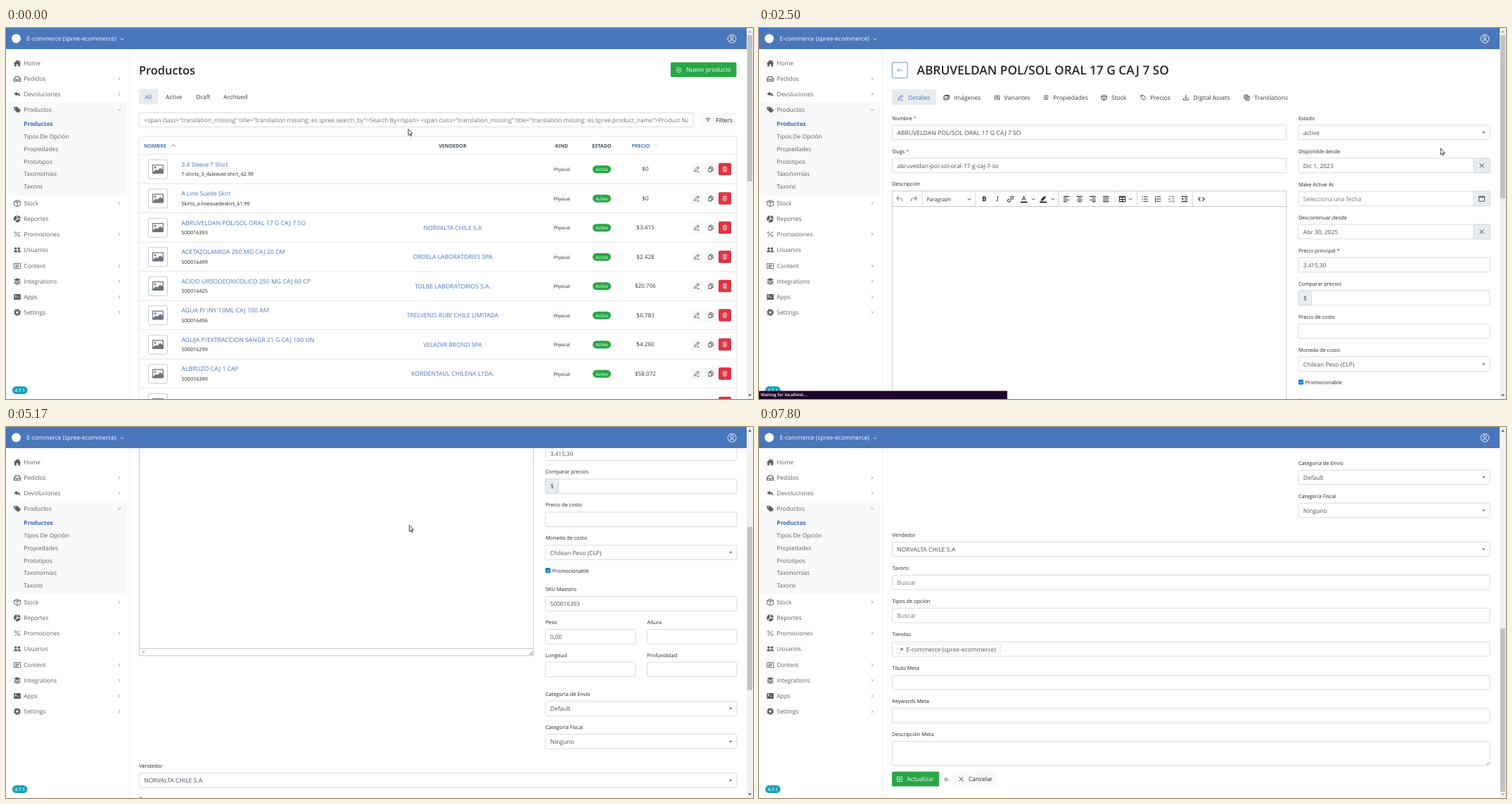
Write an HTML page that moves like this. It is 1062 px wide and 527 px high and loops after 8.13 s.

```html
<!DOCTYPE html>
<html lang="es">
<head>
<meta charset="utf-8">
<title>Productos</title>
<style>
html, body { margin: 0; width: 100%; height: 100%; overflow: hidden; background: #fff; }
svg { display: block; font-family: "Open Sans", "Noto Sans", sans-serif; text-rendering: geometricPrecision; }
</style>
</head>
<body>
<svg id="stage" width="1062" height="527" viewBox="0 0 1062 527"></svg>
<script>
const BLUE = '#4a76bb', GREEN = '#28a745', RED = '#dc3545', INK = '#495057', DARK = '#212529';
const SIDE = '#5f5f5f', LINE = '#ced4da', RULE = '#dee2e6', PALE = '#f8f9fa', SOFT = '#e9ecef';
const BASE = 8.46, CAPS = 8.7, SMALL = 7.35, HEAD = 16.4;
const LOOP = 8130;

const esc = s => s.replace(/&/g, '&amp;').replace(/</g, '&lt;').replace(/>/g, '&gt;');

// y is the middle of the capitals
function text(x, y, s, { z = BASE, c = INK, a = 'start', w = 400, more = '', tail = '' } = {}) {
  return `<text x="${x}" y="${(y + z * .355).toFixed(2)}" font-size="${z}" fill="${c}" text-anchor="${a}" font-weight="${w}" ${more}>${esc(s)}${tail}</text>`;
}
function rect(x, y, w, h, { f = 'none', s = 'none', r = 0 } = {}) {
  return `<rect x="${x}" y="${y}" width="${w}" height="${h}" rx="${r}" fill="${f}" stroke="${s}" stroke-width=".8"/>`;
}
function fill(x, y, d, c = SIDE) {
  return `<path transform="translate(${x} ${y})" d="${d}" fill="${c}" fill-rule="evenodd"/>`;
}
function line(x, y, d, c = SIDE, w = .8) {
  return `<path transform="translate(${x} ${y})" d="${d}" fill="none" stroke="${c}" stroke-width="${w}" stroke-linejoin="round"/>`;
}

const P = {
  right: 'M-1.2 -2.2L1.2 0L-1.2 2.2',
  down: 'M-2.5 -1.2L0 1.2L2.5 -1.2',
  up: 'M-3 1.6L0 -1.6L3 1.6',
  wide: 'M-3 -1.6L0 1.6L3 -1.6',
  cross: 'M-3 -3L3 3M3 -3L-3 3',
  pencil: 'M-3.5 3.5L-2.7 .8L1.8 -3.7L3.5 -2L-1 2.5ZM.6 -2.5L2.3 -.8M0 3.8H4',
  copy: 'M-3 -1.5H1V3.7H-3ZM-1.3 -1.5V-3.5H1.5L3.2 -1.8V2H1',
  trash: 'M-3 -2.4H3M-1 -2.6V-3.4H1V-2.6M-2.4 -2.2L-2 3.4H2L2.4 -2.2M-.7 -1V2.3M.7 -1V2.3',
  picture: 'M-7 -6.5H7Q8 -6.5 8 -5.5V5.5Q8 6.5 7 6.5H-7Q-8 6.5 -8 5.5V-5.5Q-8 -6.5 -7 -6.5ZM-6.8 -5.3V4L-3 .6L-.6 2L3 -1.8L6.8 .6V-5.3ZM-4 -4A1.5 1.5 0 1 1 -4 -1A1.5 1.5 0 1 1 -4 -4Z',
  caret: 'M-2.2 -1H2.2L0 1.3Z'
};

/* ---------- frame around the page ---------- */
const menuIcons = [
  fill(16, 50, 'M-5 .2L0 -4.7L2.4 -2.4V-4H3.6V-1.2L5 .2L4 .9V4.5H1.2V1.5H-1.2V4.5H-4V.9Z'),
  line(16, 72, 'M-4.5 .5L-2.6 -2.8H2.6L4.5 .5V3.3H-4.5ZM-4.5 .5H-1.6Q0 2.6 1.6 .5H4.5', SIDE, 1.2),
  fill(16, 94, 'M-4.7 -.4L-.5 -3.6V-1.7Q4.2 -1.6 4.5 3.6Q2.8 1 -.5 1V2.8Z'),
  fill(16, 116, 'M-4.7 -4H-1L4 1L.4 4.6L-4.7 -.5ZM-3.3 -2.7V-1.4H-2V-2.7ZM.3 -4L5.3 1L2.4 4.2L1.6 3.7L4.2 1L-.8 -4Z'),
  line(16, 249, 'M-4.5 -2.6L0 -4.4L4.5 -2.6V2.6L0 4.5L-4.5 2.6ZM-4.5 -2.6L0 -.8L4.5 -2.6M0 -.8V4.5M-2.3 -3.5L2.2 -1.7', SIDE, .9),
  fill(16, 271, 'M-.5 -4.7V0L-3.8 3.2A4.7 4.7 0 0 1 -.5 -4.7ZM.6 -4.7A4.7 4.7 0 0 1 4.7 -.6L.6 -.4ZM4.7 .5A4.7 4.7 0 0 1 -3 4L.4 .7Z'),
  line(16, 293, 'M-3.5 3.5L3.5 -3.5M-2.5 -3.4A1.3 1.3 0 1 1 -2.6 -3.4M2.5 .9A1.3 1.3 0 1 1 2.4 .9', SIDE, 1),
  fill(16, 315, 'M-2.2 -3.6A1.8 1.8 0 1 1 -2.3 -3.6ZM2.4 -3.6A1.8 1.8 0 1 1 2.3 -3.6ZM-5 3.6Q-4.8 .6 -2.2 .6Q0 .6 .1 3.6ZM.9 3.6Q1 1.6 .2 1Q1 .6 2.4 .6Q5 .6 5 3.6Z'),
  line(16, 338, 'M-4.6 -3.5H4.6V3.5H-4.6ZM-2.8 -1.3H2.8M-2.8 .2H2.8M-2.8 1.7H1', SIDE, .9),
  fill(16, 360, 'M0 -4.8L5 -2.5L0 -.2L-5 -2.5ZM-3.6 -.8L0 .9L3.6 -.8L5 0L0 2.3L-5 0ZM-3.6 1.6L0 3.3L3.6 1.6L5 2.4L0 4.7L-5 2.4Z'),
  fill(16, 382, 'M-4.8 -4H4.8V4H-4.8ZM-3.6 -2.5L-2 -1.2L-3.6 .1L-3 .7L-.8 -1.2L-3 -3.1ZM-.6 .3V1.1H2V.3Z'),
  `<circle cx="16" cy="404" r="2.9" fill="none" stroke="${SIDE}" stroke-width="2.3"/><circle cx="16" cy="404" r="4.4" fill="none" stroke="${SIDE}" stroke-width="1.3" stroke-dasharray="1.73"/>`
].join('');

// label, y, arrow (0 none, 1 right, 2 down)
const menu = [['Home', 50, 0], ['Pedidos', 72, 1], ['Devoluciones', 94, 1], ['Productos', 116, 2],
  ['Stock', 249, 1], ['Reportes', 271, 0], ['Promociones', 293, 1], ['Usuarios', 315, 0],
  ['Content', 338, 1], ['Integrations', 360, 1], ['Apps', 382, 1], ['Settings', 404, 1]];
const submenu = ['Tipos De Opción', 'Propiedades', 'Prototipos', 'Taxonomías', 'Taxons'];

const sidebar = rect(0, 30, 175, 497, { f: '#fff' }) + rect(175, 30, .8, 497, { f: SOFT }) +
  rect(2, 105, 170, 133, { f: PALE, r: 2 }) + menuIcons +
  menu.map(([s, y, k]) => text(25.3, y, s, { z: 8.4, c: SIDE }) +
    (k ? line(161, y, k > 1 ? P.down : P.right, '#888', .7) : '')).join('') +
  text(25.3, 136.3, 'Productos', { z: 8.2, c: '#3563b5', w: 700 }) +
  submenu.map((s, i) => text(25.3, 154.2 + i * 17.7, s, { z: 8.4, c: SIDE })).join('') +
  rect(9, 509, 21.5, 11, { f: '#17a2b8', r: 5.5 }) +
  text(19.7, 514.5, '4.7.1', { z: 6.3, c: '#fff', a: 'middle', w: 600 });

const header = rect(0, 0, 1053, 30, { f: BLUE }) +
  '<circle cx="14.5" cy="15" r="6.5" fill="#fff"/>' +
  text(29.5, 15.4, 'E-commerce (spree-ecommerce)', { c: '#fff' }) + line(165, 15.8, P.down, '#fff', .8) +
  '<circle cx="1032" cy="15.3" r="5.9" fill="none" stroke="#fff" stroke-width=".9"/>' +
  '<circle cx="1032" cy="13.6" r="2.1" fill="none" stroke="#fff" stroke-width=".9"/>' +
  line(1032, 15.3, 'M-3.9 4.2Q-2.8 1.6 0 1.6Q2.8 1.6 3.9 4.2', '#fff', .9);

/* ---------- product list ---------- */
// name, code, vendor, price
const rows = [
  ['3 4 Sleeve T Shirt', 'T-shirts_3_4sleevet-shirt_42.99', '', '0'],
  ['A Line Suede Skirt', 'Skirts_a-linesuedeskirt_61.99', '', '0'],
  ['ABRUVELDAN POL/SOL ORAL 17 G CAJ 7 SO', '500016393', 'NORVALTA CHILE S.A', '3.415'],
  ['ACETAZOLAMIDA 250 MG CAJ 20 CM', '500016499', 'ORDELA LABORATORIES SPA', '2.428'],
  ['ACIDO URSODEOXICOLICO 250 MG CAJ 60 CP', '500016425', 'TOLBE LABORATORIOS S.A.', '20.706'],
  ['AGUA P/ INY 10ML CAJ 100 AM', '500016496', 'TRELVENIS RUBI CHILE LIMITADA', '6.783'],
  ['AGUJA P/EXTRACCION SANGR 21 G CAJ 100 UN', '500016299', 'VELADIR BROND SPA', '4.260'],
  ['ALBRUZO CAJ 1 CAP', '500016390', 'KORDENTAUL CHILENA LTDA.', '58.072'],
  ['AMDROVEL 50 MG LIOF/ SOL P/INF CAJ 1 FAM', '', '', '83.241'],
  ['AMDROVEL 50 MG LIOF/ SOL P/INF CAJ 1 FAM', '500016003', 'DUMER LIMITADA', '83.241'],
  ['AMDROVEL 50 MG LIOF/ SOL P/INF CAJ 1 FAM', '', 'DUMER LIMITADA', '83.241']
];

function row([name, code, vendor, price], i) {
  const y = 200.5 + i * 41.5, mid = { a: 'middle' };
  return rect(189, y + 20.3, 850, .8, { f: RULE }) +
    rect(202.5, y - 13.3, 27, 27, { s: '#b9bfc5', r: 2 }) + fill(216, y, P.picture, '#6c757d') +
    text(249.5, code ? y - 6.7 : y, name, { z: i < 2 ? 8.4 : CAPS, c: BLUE }) +
    (code && text(249.5, y + 7, code, { z: 7.25, c: DARK })) +
    text(635, y, vendor, { ...mid, z: 8.6, c: BLUE }) +
    rect(776.5, y - 6, 27, 12, { f: PALE, r: 2 }) + text(790, y + .4, 'Physical', { ...mid, z: 6.15, c: DARK }) +
    rect(834, y - 5.3, 26, 11, { f: GREEN, r: 5.5 }) + text(847, y + .4, 'Active', { ...mid, z: 6.4, c: '#fff' }) +
    text(909, y, '$' + price, { ...mid, z: 8.15, c: '#343a40' }) +
    rect(973, y - 9, 18, 18, { f: PALE, r: 2 }) + line(982, y, P.pencil, '#333', .75) +
    rect(993, y - 9, 18, 18, { f: PALE, r: 2 }) + line(1002, y, P.copy, '#333', .85) +
    rect(1013, y - 8.8, 18, 17.6, { f: RED, r: 2 }) + line(1022, y, P.trash, '#fff', .7);
}

const missing = s => `<span class="translation_missing" title="translation missing: es.spree.${s}">`;
const th = { z: 7.2, w: 700 }, thMid = { ...th, a: 'middle' };
const list = text(189, 60.2, 'Productos', { z: HEAD, c: DARK, w: 600 }) +
  rect(945, 48.7, 93.5, 21, { f: GREEN, r: 2 }) +
  '<circle cx="956.5" cy="59.5" r="3.5" fill="none" stroke="#fff" stroke-width=".7"/>' +
  line(956.5, 59.5, 'M-1.8 0H1.8M0 -1.8V1.8', '#fff', .7) +
  text(967, 59.3, 'Nuevo producto', { c: '#fff' }) +
  rect(189, 86.5, 27, 22, { f: SOFT, r: 2 }) + text(197.5, 97.7, 'All', { c: BLUE }) +
  [[227, 'Active'], [270.5, 'Draft'], [309.3, 'Archived']].map(([x, s]) => text(x, 97.7, s, { c: '#343a40' })).join('') +
  rect(189.3, 120.3, 788, 20.2, { s: LINE, r: 2 }) +
  `<g clip-path="url(#field)">${text(196.5, 130.8, missing('search_by') + 'Search By</span> ' + missing('product_name') + 'Product Name</span>', { c: '#6c757d' })}</g>` +
  rect(986, 120, 53, 21, { f: PALE, r: 2 }) + line(998, 130.4, 'M-3.2 -2H3.2M-2.1 0H2.1M-1 2H1', '#333', .8) +
  text(1009, 130.5, 'Filters', { c: DARK }) +
  rect(189.3, 153.8, 849.5, 600, { s: RULE, r: 2 }) + rect(189, 179.3, 850, .8, { f: RULE }) +
  text(196, 167, 'NOMBRE', { ...th, c: BLUE }) + line(238, 167, P.up, BLUE) +
  text(635, 167, 'VENDEDOR', thMid) + text(790, 167, 'KIND', thMid) + text(847, 167, 'ESTADO', thMid) +
  text(889.5, 167, 'PRECIO', { ...th, c: BLUE }) + line(925, 167, P.wide, '#a9bfe0') +
  rows.map(row).join('');

/* ---------- product form ---------- */
const FULL = [189.3, 849.7], SIDECOL = [766.9, 272.2], LEFT = [189.3, 560.5];

function label(x, y, s, star) {
  return text(x, y, s, { z: SMALL, c: DARK, tail: star ? ` <tspan fill="${star}">*</tspan>` : '' });
}
function field(y, name, [x, w], { v = '', c = INK, z = BASE, select, star, gap = 20.4 } = {}) {
  return label(x, y, name, star) + rect(x, y + gap - 10.3, w, 20.6, { s: LINE, r: 2 }) +
    text(x + 6.9, y + gap + .4, v, { z, c }) + (select ? fill(x + w - 8.8, y + gap, P.caret, '#555') : '');
}
const addon = (x, y, w) => rect(x, y - 10.3, w, 20.6, { f: SOFT, s: LINE, r: 1.5 });
const calendar = 'M-4 -3H4V4H-4ZM-4 -1.6H4M-2.2 -4V-3M2.2 -4V-3';

const tabs = [
  [201, 212, 'Detalles', P.pencil], [266.5, 277, 'Imágenes', 'M-3.6 -2.2H2.6V3H-3.6ZM-2.4 -3.4H3.8V1.8M-3 2L-1 0L.6 1.4L2 .4'],
  [338.5, 348.6, 'Variantes', 'M-2.8 -3.6V3.6M0 -3.6V3.6M2.8 -3.6V3.6M-3.8 1H-1.8M-1 -1.6H1M1.8 1.6H3.8'],
  [408, 418.3, 'Propiedades', 'M-3.2 -2.4H3.2M-3.2 0H3.2M-3.2 2.4H3.2'],
  [490.5, 501, 'Stock', 'M-3.6 -2L0 -3.6L3.6 -2V2.2L0 3.8L-3.6 2.2ZM-3.6 -2L0 -.5L3.6 -2M0 -.5V3.8'],
  [546.5, 556.3, 'Precios', 'M-3.6 -3H0L3.6 .6L.6 3.6L-3.6 -.4ZM-2.2 -1.7H-1.4'],
  [607, 617.6, 'Digital Assets', 'M-3.6 1V3.4H3.6V1M0 -3.6V1.6M-1.8 -.2L0 1.6L1.8 -.2'],
  [693.5, 704.2, 'Translations', 'M-3.6 -3.6H1.4V1.4H-3.6ZM1.4 -1.4H3.6V3.6H-1.4V1.4M-2.3 .2L-1.1 -2.4L.1 .2']
];

const bars = w => [-3.6, -1.2, 1.2, 3.6].map((y, i) => w(i % 2, y)).join('');
const items = 'M-1.6 -3.2H4.2M-1.6 0H4.2M-1.6 3.2H4.2';
const shift = 'M-4.2 -3.6H4.2M0 -1.2H4.2M0 1.2H4.2M-4.2 3.6H4.2';
const tools = [
  [200, 'M-4 -1H1.5Q4 -.6 3.6 3M-1.4 -3.8L-4.2 -1L-1.4 1.8', '#888'],
  [220, 'M4 -1H-1.5Q-4 -.6 -3.6 3M1.4 -3.8L4.2 -1L1.4 1.8', '#888'],
  [357.5, 'M-.8 1.2L1.6 -1.2M-.6 -2L1 -3.6Q2.5 -4.5 3.6 -3.5Q4.6 -2.4 3.6 -1L2 .6M.6 2L-1 3.6Q-2.5 4.5 -3.6 3.5Q-4.6 2.4 -3.6 1L-2 -.6'],
  [437, bars((s, y) => `M-4.2 ${y}H${s ? 1 : 4.2}`)],
  [455.7, bars((s, y) => `M${s ? -2.4 : -4.2} ${y}H${s ? 2.4 : 4.2}`)],
  [474.5, bars((s, y) => `M${s ? -1 : -4.2} ${y}H4.2`)],
  [493.2, bars((s, y) => `M-4.2 ${y}H4.2`)],
  [516.5, 'M-4.2 -3.6H4.2V3.6H-4.2ZM-4.2 -2.7H4.2M-4.2 .5H4.2M0 -3.6V3.6'],
  [548.5, items + 'M-4.2 -3.2H-2.8M-4.2 0H-2.8M-4.2 3.2H-2.8'],
  [567, items + 'M-3.4 -4.2V-2.2M-4 -.8H-3V.8H-4M-4 2.4H-3V4H-4'],
  [586.5, shift + 'M-2 -1.6L-4 0L-2 1.6', '#999'],
  [605, shift + 'M-4 -1.6L-2 0L-4 1.6'],
  [629, 'M-1.6 -2.6L-4.2 0L-1.6 2.6M1.6 -2.6L4.2 0L1.6 2.6']
];

const TY = 243, TOOL = '#222f3e';
const editor = label(189, 221.6, 'Descripción') + rect(189.3, 231.7, 560.5, 392.3, { s: '#bbb' }) +
  rect(189, 253.2, 561, .8, { f: '#bbb' }) + rect(189, 613.2, 561, .8, { f: '#bbb' }) +
  tools.map(([x, d, c = TOOL]) => line(x, TY, d, c, 1.1)).join('') +
  [299, 390, 418, 528].map(x => line(x, TY, P.down, TOOL, .9)).join('') +
  [231.7, 307.5, 425, 504.7, 537, 616.5].map(x => rect(x, 232, .8, 21.5, { f: '#ccc' })).join('') +
  text(238.5, TY + .5, 'Paragraph', { z: 7.15, c: TOOL }) +
  text(320.3, TY, 'B', { z: 9.6, c: TOOL, a: 'middle', w: 700 }) +
  text(339, TY, 'I', { z: 9.6, c: TOOL, a: 'middle', more: 'font-style="italic" font-family="Noto Serif, serif"' }) +
  text(376.5, TY - 1, 'A', { z: 8.6, c: TOOL, a: 'middle', w: 600 }) + rect(371.8, TY + 3.6, 9.6, 1.6, { f: '#000' }) +
  fill(404, TY - .6, 'M-3 1L1.8 -3.8L4 -1.6L-.8 3.2L-3.4 3.4Z', TOOL) + rect(399.2, TY + 3.6, 9.6, 1.6, { f: '#000' }) +
  text(193.8, 619, 'P', { z: 6, c: '#777' }) + line(746.5, 620.5, 'M-2.5 2.5L2.5 -2.5M0 2.5L2.5 0', '#555', .8) +
  '<rect id="caret" x="198" y="262" width=".8" height="10" fill="#000"/>';

const pair = (y, a, b, v) => field(y, a, [766.9, 128], { v }) + field(y, b, [911.5, 127.6]);
const PRODUCT = rows[2][0];
const hint = { v: 'Buscar', c: '#6c757d' };
const form = rect(189.3, 49, 21.7, 22, { s: BLUE, r: 2 }) + line(200, 60, 'M3.5 0H-3.5M-.8 -2.7L-3.5 0L-.8 2.7', BLUE) +
  text(224.5, 60.2, PRODUCT, { z: 17.3, c: DARK, w: 600 }) +
  rect(189, 87.3, 63, 22, { f: SOFT, r: 2 }) +
  tabs.map(([ix, x, s, d], i) => line(ix, 98.8, d, i ? '#333' : BLUE, .9) + text(x, 98.8, s, { c: i ? '#343a40' : BLUE })).join('') +
  field(128, 'Nombre', LEFT, { v: PRODUCT, z: CAPS, star: RED }) +
  field(175, 'Slugs', LEFT, { v: 'abruveldan-pol-sol-oral-17-g-caj-7-so', star: RED }) + editor +
  field(128, 'Estado', SIDECOL, { v: 'active', select: 1 }) +
  field(175, 'Disponible desde', SIDECOL, { v: 'Dic 1, 2023' }) + addon(1016, 195.4, 23.1) + line(1027.5, 195.4, P.cross, '#333', .9) +
  field(222, 'Make Active At', SIDECOL, { v: 'Selecciona una fecha', c: '#6c757d' }) + addon(1016, 242.4, 23.1) + line(1027.5, 242.2, calendar, '#333', .8) +
  field(269, 'Descontinuar desde', SIDECOL, { v: 'Abr 30, 2025' }) + addon(1016, 289.4, 23.1) + line(1027.5, 289.4, P.cross, '#333', .9) +
  field(316, 'Precio principal', SIDECOL, { v: '3.415,30', z: 8.2, star: DARK }) +
  field(363, 'Comparar precios', SIDECOL) + addon(766.9, 383.4, 18.6) + text(776.3, 383.6, '$', { a: 'middle' }) +
  field(410, 'Precio de costo', SIDECOL) +
  field(457, 'Moneda de costo', SIDECOL, { v: 'Chilean Peso (CLP)', select: 1 }) +
  rect(767, 499.4, 7, 7, { f: '#0b6fd8', r: 1 }) + line(770.5, 503, 'M-2 0L-.6 1.5L2.2 -1.6', '#fff', 1) +
  text(776.7, 503.5, 'Promocionable', { z: SMALL, c: DARK }) +
  field(529.7, 'SKU Maestro', SIDECOL, { v: '500016393', z: 8.2 }) +
  pair(576.6, 'Peso', 'Altura', '0,00') + pair(623.4, 'Longitud', 'Profundidad') +
  field(678.6, 'Categoría de Envío', SIDECOL, { v: 'Default', select: 1 }) +
  field(725.6, 'Categoría Fiscal', SIDECOL, { v: 'Ninguno', select: 1 }) +
  field(780.8, 'Vendedor', FULL, { v: 'NORVALTA CHILE S.A', z: 8.6, select: 1 }) +
  field(827.8, 'Taxons', FULL, hint) + field(874.8, 'Tipos de opción', FULL, hint) +
  field(921.8, 'Tiendas', FULL, { gap: 21 }) + rect(195.6, 935.6, 147.8, 14.2, { s: RULE, r: 2 }) +
  line(203, 943.2, 'M-1.7 -1.7L1.7 1.7M1.7 -1.7L-1.7 1.7', '#333', 1) + text(209.3, 943.2, 'E-commerce (spree-ecommerce)') +
  field(969.8, 'Título Meta', FULL) + field(1016.9, 'Keywords Meta', FULL) +
  label(189, 1064, 'Descripción Meta') + rect(189.3, 1074, 849.7, 34, { s: LINE, r: 2 }) +
  line(1036, 1105, 'M-2 2L2 -2M0 2L2 0', '#666', .6) +
  rect(189, 1117, 67, 21, { f: GREEN, r: 2 }) + line(200, 1127.6, 'M-1.5 -3.4H-3.4V3.4H3.4V-3.4H1.5M0 -3.6V1.4M-1.6 -.2L0 1.4L1.6 -.2', '#fff') +
  text(210.3, 1127.6, 'Actualizar', { c: '#fff' }) + text(263.5, 1127.6, 'o', { c: DARK }) +
  rect(276, 1117, 63, 21, { f: PALE, r: 2 }) + line(287.5, 1127.6, P.cross, '#333', .9) + text(298, 1127.6, 'Cancelar', { c: DARK });

const $ = id => document.getElementById(id);
$('stage').innerHTML = `<clipPath id="field"><rect x="190" y="121" width="780" height="19"/></clipPath>
  <g id="list">${list}</g><g id="form">${form}</g>${sidebar}${header}
  <rect id="bar" width="0" height="1.7" fill="#0076ff"/>
  <rect x="1053" width="9" height="527" fill="#f1f1f1"/>
  <path id="top" d="M1055 6.5L1057.5 3.8L1060 6.5Z"/><path id="end" d="M1055 520.5L1057.5 523.2L1060 520.5Z"/>
  <rect id="thumb" x="1054" width="7" fill="#c1c1c1"/>
  <g id="status">${rect(0, 515.5, 353, 11.5, { f: '#1e0529' })}${text(2.5, 521.2, 'Waiting for localhost...', { z: 6.1, c: '#fff', w: 600 })}</g>
  <path id="cursor" d="M.4 .4V9.4L2.4 7.5L3.8 10.6L5.1 10L3.7 7H6.5Z" fill="#fff" stroke="#111" stroke-width=".8"/>`;

/* ---------- motion ---------- */
const SWAP = 2130;
const cursorPath = [[30, 571.5, 143], [430, 955, 58], [830, 984, 178], [1200, 981, 188], [1430, 981, 188], [1670, 980, 171],
  [2470, 980, 171], [3370, 650.5, 159.5], [4000, 542, 133], [4230, 542, 133], [4300, 545.5, 133], [4470, 545.5, 133],
  [4630, 548.5, 131.3], [4930, 549.5, 131], [5330, 588.5, 144.5], [6640, 588.5, 144.5], [7470, 326, 441], [7800, 36, 529]];
const listScroll = [[870, 0], [1030, 55.3], [1120, 55.3], [1290, 110.6]];
const formScroll = [[3300, 0], [3370, 33], [3480, 55.3], [3560, 80], [3680, 110.6], [3760, 130], [3900, 165.9],
  [4900, 165.9], [5130, 276.5], [5330, 387], [5470, 387], [5600, 443.9], [5700, 497.7], [5900, 497.7], [6030, 561], [6170, 627.5]];
const barWidth = [[2480, 0], [2700, 105], [3000, 130], [3190, 150], [3370, 883], [3480, 1053]];

function at(steps, t, k = 1) {
  const i = steps.findIndex(s => s[0] > t);
  if (i === 0) return steps[0][k];
  if (i < 0) return steps[steps.length - 1][k];
  const a = steps[i - 1], b = steps[i];
  return a[k] + (b[k] - a[k]) * (t - a[0]) / (b[0] - a[0]);
}
const show = (id, on) => $(id).setAttribute('display', on ? 'inline' : 'none');

function draw(t) {
  const onForm = t >= SWAP;
  const y = at(onForm ? formScroll : listScroll, t);
  const page = onForm ? 1154.5 : 1287, max = page - 527;
  show('list', !onForm);
  show('form', onForm);
  $(onForm ? 'form' : 'list').setAttribute('transform', `translate(0 ${-y})`);
  $('thumb').setAttribute('height', 508 * 527 / page);
  $('thumb').setAttribute('y', 10 + 508 * y / page);
  $('top').setAttribute('fill', y > .5 ? '#505050' : '#a3a3a3');
  $('end').setAttribute('fill', y < max - .5 ? '#505050' : '#a3a3a3');
  $('bar').setAttribute('width', at(barWidth, t));
  $('bar').setAttribute('opacity', at([[3480, 1], [3630, 0]], t));
  show('status', onForm && t < 3700);
  show('caret', t >= 4770 && t < 5270);
  $('cursor').setAttribute('transform', `translate(${at(cursorPath, t)} ${at(cursorPath, t, 2)})`);
}

const start = performance.now();
function tick() {
  draw((performance.now() - start) % LOOP);
  requestAnimationFrame(tick);
}
draw(0);
requestAnimationFrame(tick);
</script>
</body>
</html>
```
